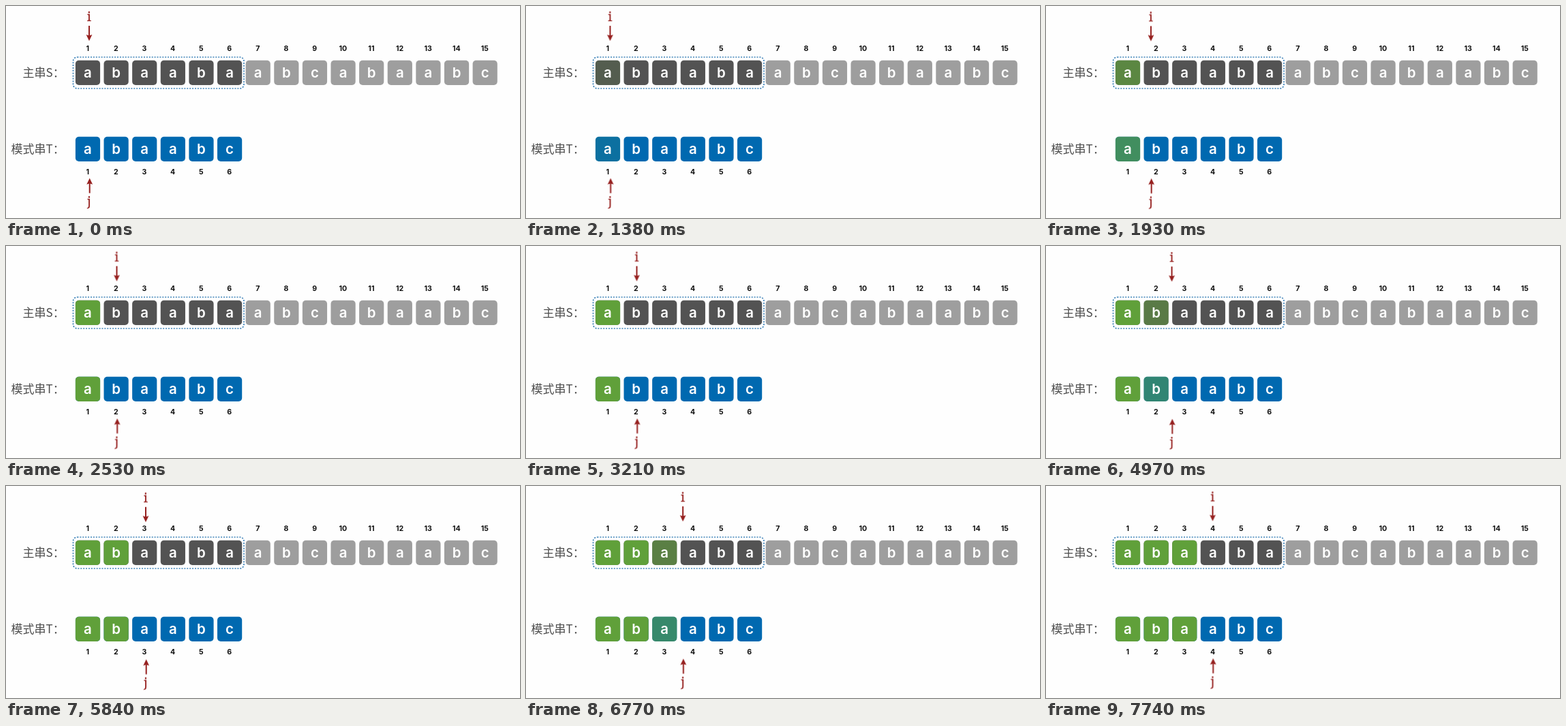
Write an HTML page that moves like this. It is 754 px wide and 311 px high and loops after 8000 ms.

```html
<!DOCTYPE html>
<html lang="zh-CN">
<head>
<meta charset="utf-8">
<title>串的模式匹配</title>
<style>
  html, body { margin: 0; width: 100%; height: 100%; overflow: hidden; background: #fefefe; }
  svg { display: block; width: 754px; height: 311px; }
  text { text-anchor: middle; }
  .letter { font: 600 20.5px Inter, "Liberation Sans", sans-serif; fill: #fff; }
  .index { font: 700 10.6px Inter, "Liberation Sans", sans-serif; fill: #111; }
  .label { font: 17px "Noto Sans CJK SC", "Noto Sans CJK", sans-serif; fill: #4c4c4c; text-anchor: start; }
  .name { font: 18px "Noto Serif", serif; fill: #96201f; stroke: #96201f; stroke-width: 0.35; }
  .shaft { stroke: #96201f; stroke-width: 2; }
  .head { fill: #96201f; }
  .window { fill: none; stroke: #3d82b8; stroke-width: 1.7; stroke-dasharray: 2 1.9; }

  .pointer { animation: step 8s infinite; }
  .match { fill: #60a03a; opacity: 0; animation: 8s linear infinite; }
  .m0 { animation-name: match0; }
  .m1 { animation-name: match1; }
  .m2 { animation-name: match2; }

  /* Each move lasts one second; the matched cell fades along with it. */
  @keyframes step {
    0%, 15.625% { transform: translate(0, 0); animation-timing-function: ease-in-out; }
    28.125%, 55.75% { transform: translate(40.5px, 0.5px); animation-timing-function: ease-in-out; }
    68.25%, 77.375% { transform: translate(83px, 1.7px); animation-timing-function: ease-in-out; }
    89.875%, 100% { transform: translate(122.5px, 0.3px); }
  }
  @keyframes match0 { 0%, 15.625% { opacity: 0; } 28.125%, 100% { opacity: 1; } }
  @keyframes match1 { 0%, 55.75% { opacity: 0; } 68.25%, 100% { opacity: 1; } }
  @keyframes match2 { 0%, 77.375% { opacity: 0; } 89.875%, 100% { opacity: 1; } }
</style>
</head>
<body>
<svg id="stage" viewBox="0 0 754 311" xmlns="http://www.w3.org/2000/svg">
  <text class="label" x="24.5" y="104">主串S：</text>
  <text class="label" x="7.5" y="216">模式串T：</text>
  <g id="cells"></g>
  <rect class="window" x="98.5" y="75" width="250.5" height="46" rx="6"/>
  <g class="pointer">
    <text class="name" x="122" y="21.7">i</text>
    <path class="shaft" d="M122 29V45"/>
    <path class="head" d="M117.6 42L122 43.5L126.4 42L122 51.3Z"/>
  </g>
  <g class="pointer">
    <path class="shaft" d="M122.7 274.5V258"/>
    <path class="head" d="M118.3 261.8L122.7 260.3L127.1 261.8L122.7 252.5Z"/>
    <text class="name" x="122" y="292.7">j</text>
  </g>
</svg>
<script>
  const PITCH = 41.62, LEFT = 101.9, SIZE = 36.2, MATCHES = 3;
  const cells = document.getElementById('cells');

  function add(tag, attrs, text = '') {
    const el = document.createElementNS('http://www.w3.org/2000/svg', tag);
    for (const key in attrs) el.setAttribute(key, attrs[key]);
    el.textContent = text;
    cells.append(el);
  }

  function drawRow(word, y, indexY, colour) {
    [...word].forEach((ch, n) => {
      const x = LEFT + n * PITCH, mid = x + SIZE / 2;
      const box = { x, y, width: SIZE, height: SIZE, rx: 5 };
      const matched = n < MATCHES;
      add('rect', { ...box, fill: colour(n) });
      if (matched) add('rect', { ...box, class: 'match m' + n });
      add('text', { class: 'letter', x: mid, y: y + 25.4 }, ch);
      add('text', { class: 'index', x: mid - 0.3, y: indexY }, n + 1);
    });
  }

  drawRow('abaabaabcabaabc', 79.7, 65.7, n => n < 6 ? '#535353' : '#9e9e9e');
  drawRow('abaabc', 191.7, 247.2, () => '#0069b0');
</script>
</body>
</html>
```
